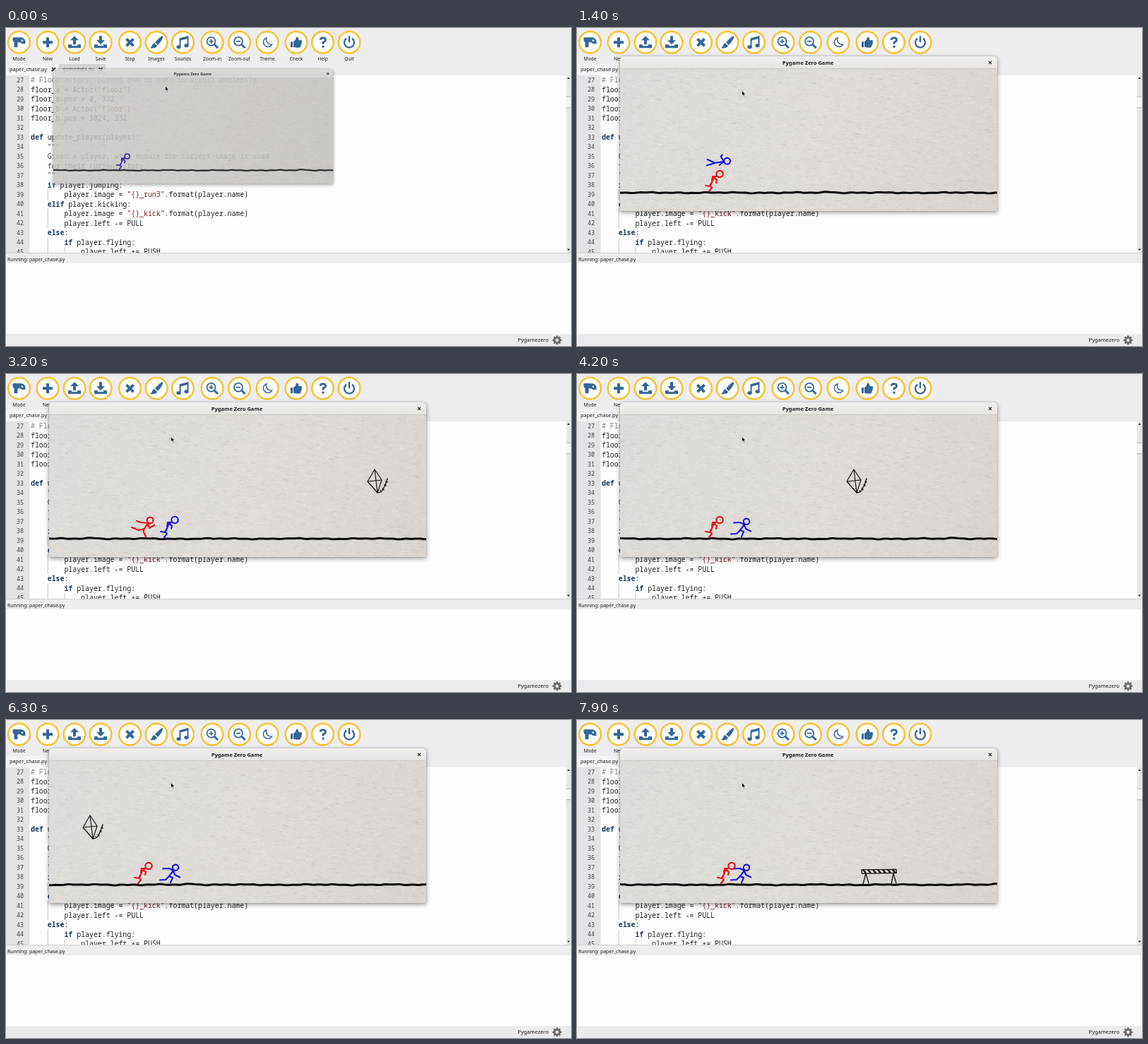
Write an HTML page with a canvas that moves like this. It is 800 by 450 pixels and loops after 8000 ms.

```html
<!DOCTYPE html>
<html lang="en">
<head>
<meta charset="utf-8">
<title>Paper chase</title>
<style>
  html, body { margin: 0; width: 100%; height: 100%; overflow: hidden; background: #fff; }
  #stage { position: absolute; left: 0; top: 0; width: 800px; height: 450px; overflow: hidden; }
  svg { position: absolute; left: 0; top: 0; }
  text { white-space: pre; }
  .ui { font-family: "Noto Sans", "Open Sans", sans-serif; fill: #1c1c1c; }
  .code { font: 9.9px "Noto Sans Mono", monospace; fill: #222; }
  .num { font: 8.4px "Noto Sans Mono", monospace; fill: #444; text-anchor: end; }
  .kw { fill: #1c3a5c; font-weight: 600; }
  .str { fill: #7d2222; }
  .doc { fill: #4a4a4a; }
  .com { fill: #858585; }
  .icon { fill: none; stroke: #336699; stroke-width: 3; }
  .icon .solid { fill: #336699; stroke: none; }
  .icon .thin { stroke-width: 1.8; }
  #win { position: absolute; left: 61px; top: 40px; width: 533.5px; height: 219px;
    transform-origin: 0 0; border-radius: 5px 5px 0 0;
    box-shadow: 0 2px 6px rgba(0,0,0,.42), 0 0 1px rgba(0,0,0,.6); will-change: transform; }
  #bar { position: absolute; width: 100%; height: 18px; border-radius: 5px 5px 0 0;
    background: linear-gradient(#f0eeed, #e8e5e2); border-bottom: 1px solid #cdc8c3; box-sizing: border-box; }
  #paper { position: absolute; left: 0; top: 18px; width: 533.5px; height: 201px; }
  .ink { fill: none; stroke-linecap: round; stroke-linejoin: round; }
</style>
</head>
<body>
<div id="stage">
  <svg id="editor" width="800" height="450" viewBox="0 0 800 450"></svg>
  <div id="win">
    <div id="bar"></div>
    <canvas id="paper" width="534" height="201"></canvas>
    <svg width="533.5" height="219" viewBox="61 40 533.5 219">
      <text class="ui" x="327" y="51.6" font-size="7.5" font-weight="600" text-anchor="middle">Pygame Zero Game</text>
      <path d="M583 47l4 4m0-4l-4 4" stroke="#2e3436" stroke-width="1.3"/>
      <g id="kite" class="ink" stroke="#171513" stroke-width="1.2">
        <path d="M-4-17L-14 0L0 16L6-2ZL0 16M-14 0L6-2"/>
        <path d="M0 16Q5 16 8 11Q12 4 14-4M4 13l1 2M7 10l2 2M10 5l2 1M12 0l2 1" stroke-width="1.4"/>
      </g>
      <g id="barrier" class="ink" stroke="#171513" stroke-width="1.3">
        <path d="M-18 217L-22 232M-18 217L-14 231M21 217L18 232M21 217L25 231"/>
        <path d="M-24 211.8L25 211.3L25.5 216.3L-23.5 217.3Z" fill="#ddd8d2"/>
        <path id="stripes" stroke-width="2.4" stroke-linecap="butt"/>
      </g>
      <path id="floor" class="ink" stroke="#0b0a0a" stroke-width="3"/>
      <path id="red" class="ink" stroke="#ee1118" stroke-width="2.2"/>
      <path id="blue" class="ink" stroke="#1812e0" stroke-width="2.1"/>
    </svg>
  </div>
  <svg width="800" height="450" viewBox="0 0 800 450">
    <path id="cursor" d="M0 0V7.3L1.7 5.8L2.9 8.4L4.1 7.9L3 5.3H5.2Z" fill="#111" stroke="#fff" stroke-width=".6"/>
  </svg>
</div>
<script>
const $ = id => document.getElementById(id);
const LOOP = 8000, STEP = 100, SPEED = 0.13;

// ---- Editor ----
const rect = (x, y, w, h, fill) => `<rect x="${x}" y="${y}" width="${w}" height="${h}" fill="${fill}"/>`;
const label = (x, y, size, text, more = '') => `<text class="ui" x="${x}" y="${y}" font-size="${size}" ${more}>${text}</text>`;
const cross = (x, y, r, color) => `<path d="M${x - r} ${y - r}l${2 * r} ${2 * r}m0 ${-2 * r}l${-2 * r} ${2 * r}" stroke="${color}" stroke-width="2"/>`;

const lens = '<circle cx="-1.5" cy="-1.5" r="6" class="thin"/><path d="M3 3L8 8"/>';
const tray = '<path class="solid" d="M-9 3H-4V5H4V3H9V8H-9Z"/>';
const tools = [
  ['Mode', 18.5, '<path class="solid" d="M-9-6Q-9-7-7-7H3Q9-6 9 0V2H4Q3 0 0 0H-2V7H-7V0Q-9-1-9-3Z"/><circle cx="4.5" cy="-2.5" r="1.4" fill="#fff" stroke="none"/>'],
  ['New', 59, '<path d="M-7 0H7M0-7V7" stroke-width="4"/>'],
  ['Load', 97, tray + '<path class="solid" d="M0-9L6-3H2V3H-2V-3H-6Z"/>'],
  ['Save', 134, tray + '<path class="solid" d="M0 3L6-3H2V-9H-2V-3H-6Z"/>'],
  ['Stop', 175.5, '<path d="M-5-5L5 5M5-5L-5 5" stroke-width="4"/>'],
  ['Images', 213, '<path class="solid" d="M9-9Q6-9-2 0L2 4Q10-5 9-9ZM-3 1L1 5Q-1 9-9 8Q-6 6-6 4Q-5 1-3 1Z"/>'],
  ['Sounds', 250.5, '<path d="M-4 6V-5L7-8V4" stroke-width="2"/><path d="M-4-4L7-7"/><ellipse class="solid" cx="-6" cy="6.5" rx="3.2" ry="2.6"/><ellipse class="solid" cx="5" cy="4.5" rx="3.2" ry="2.6"/>'],
  ['Zoom-in', 292, lens + '<path class="thin" d="M-4.5-1.5H1.5M-1.5-4.5V1.5"/>'],
  ['Zoom-out', 330.5, lens + '<path class="thin" d="M-4.5-1.5H1.5"/>'],
  ['Theme', 370, '<path d="M-1-6.5A6.5 6.5 0 1 0 6.5 3A7 7 0 0 1-1-6.5Z" stroke-width="1.4"/>'],
  ['Check', 411, '<path class="solid" d="M-8-1H-5V7H-8ZM-4-1Q0-4 0-7.5Q3.5-8 3.5-3H7.5Q9-1 7.5 1Q8.500 3 6.500 4Q6.500 7.500 4 7.500H0L-4 6.500Z"/>'],
  ['Help', 448.5, '<path d="M-3.5-3.5Q-3-6.500 0-6.500Q4-6.500 4-3.500Q4-1 .5 0V2.500" stroke-width="2.8"/><path d="M.5 4.500V7.500"/>'],
  ['Quit', 486, '<path d="M-4-5.500A7 7 0 1 0 4-5.500M0-9V0" stroke-width="2.3"/>']
];
const toolbar = tools.map(([name, x, art]) =>
  `<circle cx="${x}" cy="20.3" r="15.3" fill="#fefefe" stroke="#f5c431" stroke-width="2.5"/>
   <g class="icon" transform="translate(${x} 20.3)">${art}</g>` +
  label(x, 45.5, 6.7, name, 'text-anchor="middle"')).join('');

const source = `# Floor actors, placed end to end, to scroll endlessly
floor_a = Actor('floor')
floor_a.pos = 0, 332
floor_b = Actor('floor')
floor_b.pos = 1024, 332

def update_player(player):
    """
    Given a player, will ensure the correct image is used
    for their current state.
    """
    if player.jumping:
        player.image = "{}_run3".format(player.name)
    elif player.kicking:
        player.image = "{}_kick".format(player.name)
        player.left -= PULL
    else:
        if player.flying:
            player.left += PUSH`.split('\n');

const span = (kind, text) => `<tspan class="${kind}">${text}</tspan>`;
function highlight(line, i) {
  if (line[0] === '#') return span('com', line);
  if (i > 6 && i < 11) return span('doc', line);
  return line.replace(/("[^"]*"|'[^']*')|\b(def|if|elif|else)\b/g,
    (m, str) => span(str ? 'str' : 'kw', m));
}
const code = source.map((line, i) => {
  const y = 77 + i * 13.5;
  const depth = line.search(/\S/) / 4;
  let guides = '';
  for (let d = 1; d < depth; d++) guides += rect(35 + d * 23.76, y - 10, 0.8, 13.5, '#bbb');
  return `<text class="num" x="25" y="${y - 0.3}">${27 + i}</text>${guides}
    <text class="code" x="35" y="${y}">${highlight(line, i)}</text>`;
}).join('');

const teeth = Array.from({ length: 8 }, (_, i) =>
  `<rect x="-1.3" y="-6.4" width="2.6" height="3" transform="rotate(${i * 45})"/>`).join('');

$('editor').innerHTML =
  rect(0, 0, 800, 67, '#edecee') + toolbar +
  rect(0, 51, 73, 16, '#f4f4f5') + rect(75, 51, 66, 15, '#d2d2d2') +
  label(5, 61.4, 7.3, 'paper_chase.py') + cross(67.5, 58.7, 2.6, '#444') +
  label(80, 61.4, 7.3, 'gamedata.py') + cross(134, 58.7, 2.6, '#444') +
  rect(0, 67, 800, 252, '#fefdfe') + rect(0, 67, 33.5, 252, '#e3e2e4') + code +
  rect(793, 67, 7, 251, '#e8e8e8') + rect(793, 97, 7, 16, '#f4f4f4') +
  rect(793, 97, 7, 0.7, '#aaa') + rect(793, 112.5, 7, 0.7, '#999') +
  '<path d="M794.5 72l2-2.5l2 2.5zM794.5 312.5l2 2.5l2-2.5z" fill="#333"/>' +
  rect(0, 318, 800, 15, '#edecee') + rect(0, 318, 800, 0.7, '#c4c4c4') +
  label(2, 329.5, 6.9, 'Running: paper_chase.py') +
  rect(0, 333, 800, 100, '#fefdfe') + rect(0, 433, 800, 17, '#ebeaec') +
  label(724.6, 444.2, 7.5, 'Pygamezero') +
  `<g transform="translate(780.3 441.7)" fill="#6b6b6b">${teeth}
   <circle r="3.6" fill="none" stroke="#6b6b6b" stroke-width="2.8"/></g>`;

// ---- Paper ----
(function drawPaper() {
  const c = $('paper').getContext('2d');
  let seed = 7;
  const rnd = () => (seed = seed * 16807 % 2147483647) / 2147483647;
  const tone = c.createLinearGradient(0, 0, 534, 201);
  tone.addColorStop(0, '#dddbd8');
  tone.addColorStop(0.5, '#dfdbd6');
  tone.addColorStop(1, '#d8d3ce');
  c.fillStyle = tone;
  c.fillRect(0, 0, 534, 201);
  c.lineWidth = 0.9;
  for (let i = 0; i < 5000; i++) {
    const x = rnd() * 540 - 5, y = rnd() * 201, w = 2 + rnd() * 5, tilt = rnd() * 3 - 1;
    c.strokeStyle = rnd() < 0.5 ? 'rgba(110,98,86,.08)' : 'rgba(255,253,250,.17)';
    c.beginPath();
    c.moveTo(x, y);
    c.quadraticCurveTo(x + w / 2, y + tilt - 1, x + w, y + tilt);
    c.stroke();
  }
})();

let stripes = '';
for (let x = -20; x < 25; x += 7) stripes += `M${x - 2} 211.8L${x + 2} 216.800`;
$('stripes').setAttribute('d', stripes);

// ---- Runners ----
const head = (x, y, r) => `M${x - r} ${y}a${r} ${r} 0 1 1 ${2 * r} 0a${r} ${r} 0 1 1 ${-2 * r} 0`;
const RUN = [
  head(202, 206.5, 4.7) + 'M198 209L193 213L190 221M197 210L192 210L191 216M194 212L198 215L197 219M190 220L188 224L182 223M188 223L191 226L187 231',
  head(203, 208.8, 4.2) + 'M200 213L194 221M200 213L194 210L185 210.5M200 214L202 219L209 222.5M194 221L189 226L181 226.5M194 221L199 223L196 230',
  head(204, 207, 4.4) + 'M201 211L196 219M201 211L191 210L185 208M201 212L203 218L210 214M196 219L188 221L178 217M195 219L195 224L198 230'
];
const FLY = {
  blue: head(207, 188.3, 4.4) + 'M202 189L190 191L179 186M190 191L178 194.5M202 188L198 182L200 179.5M201 190L196 194',
  red: head(206, 188.8, 4.3) + 'M202 189L191 191L179 189M191 191L179 195.5M202 188L196 182M202 190L197 193'
};
const FLIGHT = 500, RISE = 29;
const flights = {
  blue: [{ at: 1200, gain: 14 }, { at: 2050, gain: 23 }],
  red: [{ at: 6850, gain: 17 }]
};
const clamp = v => Math.max(0, Math.min(1, v));

function drawRunner(name, t, pose) {
  let x = 0, lift = 0, flying = false;
  for (const f of flights[name]) {
    const p = (t - f.at) / FLIGHT;
    x += f.gain * clamp(p);
    if (p > 0 && p < 1) {
      flying = true;
      lift = clamp(Math.min(p, 1 - p) / 0.25);
    }
  }
  const y = flying ? RISE * (1 - lift) : 0;
  $(name).setAttribute('d', flying ? FLY[name] : RUN[(pose + 3) % 3]);
  $(name).setAttribute('transform', `translate(${x} ${y})`);
}

// ---- Ground ----
const PERIOD = 543;
function groundY(u) {
  const a = u * 2 * Math.PI / PERIOD;
  const fromBump = ((u - 540 + PERIOD * 2.5) % PERIOD) - PERIOD / 2;
  return 233.1 + 0.3 * Math.sin(5 * a + 1) + 0.3 * Math.sin(13 * a) + 0.3 * Math.sin(29 * a + 2)
    - 1.2 * Math.exp(-((fromBump / 12) ** 2));
}
function groundPath(shift) {
  let d = '';
  for (let x = 61; x <= 595; x += 3) d += `${d ? 'L' : 'M'}${x} ${groundY(x + shift).toFixed(2)}`;
  return d;
}

function render(now) {
  const t = Math.floor((now % LOOP) / STEP) * STEP;
  const closed = (1 - clamp(t / 200)) ** 2;
  const win = $('win').style;
  win.transform = `translate(${6 * closed}px, ${18 * closed}px) scale(${1 - 0.258 * closed})`;
  win.opacity = 1 - 0.14 * closed;
  win.filter = closed ? `brightness(${1 - 0.1 * closed})` : 'none';
  $('cursor').setAttribute('transform', `translate(${233.5 - 8 * closed} ${88.6 - 6.6 * closed})`);

  const pose = Math.floor((t - 50) / 136) + 1;
  drawRunner('blue', t, pose);
  drawRunner('red', t, t < 50 ? pose : pose - 1);
  $('floor').setAttribute('d', groundPath(t * SPEED));
  $('kite').setAttribute('transform', `translate(${396 - (t - 4200) * SPEED} 152)`);
  $('barrier').setAttribute('transform', `translate(${531 - (t - 7100) * SPEED} 0)`);
}

let start = null;
function tick(now) {
  if (start === null) start = now;
  render(now - start);
  requestAnimationFrame(tick);
}
render(0);
requestAnimationFrame(tick);
</script>
</body>
</html>
```
